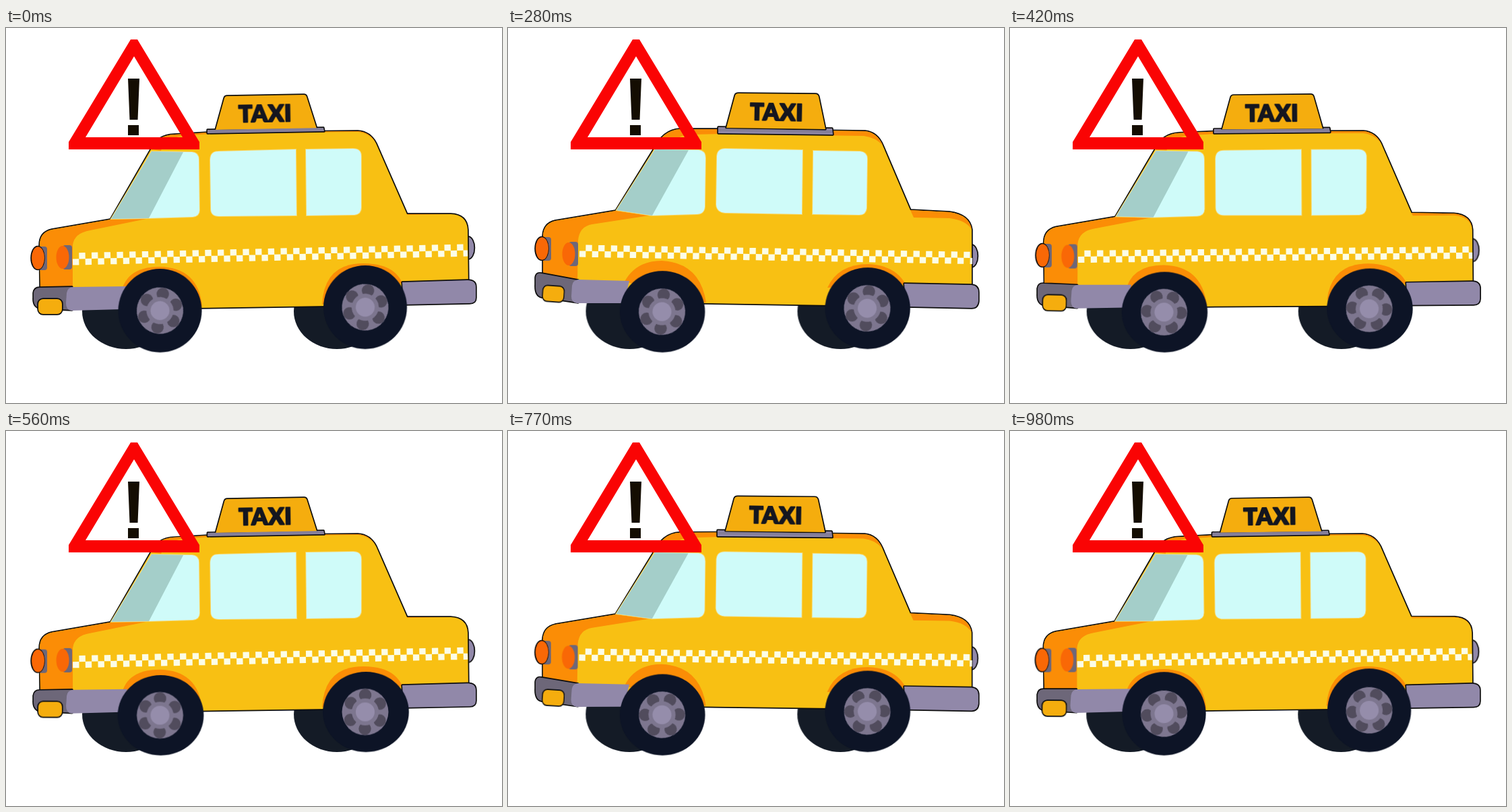
Recreate the animation shown at these times as an HTML page without scripts. Size 736 px wide and 556 px high, loop 1.05 s.

```html
<!DOCTYPE html>
<html lang="en">
<head>
<meta charset="utf-8">
<title>Taxi warning</title>
<style>
  html, body { margin: 0; height: 100%; overflow: hidden; background: #fff; }
  svg { display: block; width: 100vw; height: 100vh; }

  /* Share of the tilted pose, held for 70 ms each */
  :root {
    --sway: linear(
      0 0% 6.667%, .28 6.667% 13.333%, .64 13.333% 20%, .92 20% 26.667%,
      1 26.667% 33.333%, .7 33.333% 40%, .29 40% 46.667%, .05 46.667% 53.333%,
      .02 53.333% 60%, .28 60% 66.667%, .64 66.667% 73.333%, .92 73.333% 80%,
      1 80% 86.667%, .64 86.667% 93.333%, .1 93.333% 100%);
  }
  .bend { animation: bend 1050ms var(--sway) infinite; }
  .shift {
    transform-box: fill-box; transform-origin: 50% 100%;
    animation: shift 1050ms var(--sway) infinite;
  }
  .spin { animation: spin 1050ms steps(15) infinite; }
  @keyframes bend { to { d: var(--to); } }
  @keyframes shift { to { transform: var(--to); } }
  /* The hub repeats every 60 degrees, so 480 degrees closes the loop */
  @keyframes spin { from { transform: rotate(38deg); } to { transform: rotate(-442deg); } }

  .edge { stroke: #0d0d0d; stroke-width: 3.4; stroke-linejoin: round; paint-order: stroke; }
  .yellow { fill: #f8c013; }
  .orange { fill: #fb8d06; }
  .amber { fill: #f5ad0e; }
  .lilac { fill: #9188a9; }
  .grey { fill: #6d6779; }
  .lamp { fill: #f96806; }
  .glass { fill: #cffbf9; stroke: #f9d461; stroke-width: 2; paint-order: stroke; }
  .shade { fill: #a4cec9; }
  .far { fill: #141b26; }
  .tyre { fill: #0d1426; }
  .check { fill: none; stroke: #fcfde6; stroke-width: 9.2; stroke-dasharray: 9.35; }
  .sign {
    font: 900 34px Lato, "Open Sans", sans-serif; text-anchor: middle; letter-spacing: .7px;
    fill: #14161f; stroke: #14161f; stroke-width: 1.8; stroke-linejoin: round;
    transform: translate(0, 0) rotate(-1deg);
  }
</style>
</head>
<body>
<svg viewBox="0 0 736 556">
  <defs>
    <g id="wheel">
      <circle class="tyre shift" r="62" style="--to:translate(1px,0) scale(1.03,.96)"/>
      <g class="shift" style="--to:translate(0,2.5px)">
        <g class="spin" style="transform-origin:0 0">
          <circle r="34.5" fill="#7d768f"/>
          <circle r="25" fill="none" stroke="#514c5d" stroke-width="18.5" stroke-linecap="round" stroke-dasharray="0 26.18"/>
          <circle r="20" fill="#7d768f"/>
          <circle r="14" fill="#958dab"/>
        </g>
      </g>
    </g>
  </defs>

  <!-- Far wheels and tail light -->
  <g class="far shift" style="--to:translate(2.5px,0)">
    <ellipse cx="178" cy="420" rx="65" ry="56"/>
    <ellipse cx="491" cy="420" rx="64" ry="56"/>
  </g>
  <ellipse class="lilac edge shift" cx="686" cy="326" rx="8.5" ry="16" style="--to:translate(2px,12px)"/>

  <!-- Body -->
  <path class="yellow edge bend"
    d="M51 385L50 322Q50 303 68 299L155 284L215 180Q224 159 250 158L300 155L522 153Q540 154 549 171L595 276L660 276Q684 277 685 299L686 385L590 390L480 412L285 415L170 416L100 390Z"
    style="--to:path('M52 368L52 308Q53 290 70 286L160 271L215 182Q230 151 255 150L312 150L530 153Q548 155 556 174L597 270L655 273Q685 277 688 299L688 388L590 392L480 411L290 408L170 405L100 375Z')"/>
  <g class="orange">
    <path class="bend"
      d="M51 386L50 322Q50 303 68 299L155 284L213 282L125 300Q101 304 99 322L99 386Z"
      style="--to:path('M52 370L52 308Q53 290 70 286L160 271L210 278L125 291Q106 294 104 315L103 376Z')"/>
    <path class="bend"
      d="M215 180Q224 159 250 158L300 155L522 153Q540 154 549 171Q540 156 522 154L300 157L262 160Q235 164 230 182Z"
      style="--to:path('M215 182Q230 151 255 150L312 150L530 153Q548 155 556 174Q545 162 528 160L312 157L270 158Q245 160 238 182Z')"/>
    <path class="bend"
      d="M595 276L660 276Q684 277 685 299Q684 277 660 276L596 277Z"
      style="--to:path('M597 270L655 273Q685 277 688 299Q680 285 655 282L602 281Z')"/>
    <path class="bend"
      d="M170 400Q174 354 228 354Q285 355 291 412Z"
      style="--to:path('M173 376Q190 345 228 345Q285 348 294 407Z')"/>
    <path class="bend"
      d="M469 410Q472 349 530 349Q575 349 588 378Z"
      style="--to:path('M474 385Q490 350 535 350Q575 352 590 380Z')"/>
  </g>

  <!-- Checker band -->
  <path class="check bend" stroke-dashoffset="9.35" d="M99 338L685 325" style="--to:path('M106 326L689 336.500')"/>
  <path class="check bend" d="M99 347L685 334" style="--to:path('M106 335L689 345.500')"/>

  <!-- Windows -->
  <path class="glass bend"
    d="M216 183L276 184Q286 185 286 195L287 270Q287 279 277 280L212 282L156 283Z"
    style="--to:path('M218 180L283 181Q293 182 293 193L292 265Q291 276 280 276L214 278L161 270Z')"/>
  <path class="shade bend"
    d="M216 183L263 184L212 282L156 283Z"
    style="--to:path('M218 180L268 181L214 278L161 270Z')"/>
  <path class="glass bend"
    d="M315 183L430 180L431 278L316 279Q304 279 304 268L303 196Q303 183 315 183Z"
    style="--to:path('M322 179L437 181L436 276L322 274Q310 273 309 262L310 190Q311 179 322 179Z')"/>
  <path class="glass bend"
    d="M445 180L515 179Q527 179 527 190L527 266Q527 276 517 277L446 278Z"
    style="--to:path('M453 182L522 183Q533 184 533 194L532 267Q531 277 521 277L452 276Z')"/>

  <!-- Roof sign -->
  <path class="lilac edge bend"
    d="M299 151L471 148L472 153L299 156Z"
    style="--to:path('M312 147L481 149L482 158L312 156Z')"/>
  <path class="amber edge bend"
    d="M311 151L324 104Q325 101 328 101L442 99Q445 99 446 102L461 149Z"
    style="--to:path('M324 148L337 100Q338 97 342 97L456 98Q460 98 461 102L471 150Z')"/>
  <path class="bend" fill="none" stroke="#847e98" stroke-width="4"
    d="M300 153L471 150" style="--to:path('M313 151L481 154')"/>
  <text class="sign shift" x="385" y="139" style="--to:translate(13.5px,-2px) rotate(1.2deg)">TAXI</text>

  <!-- Headlights -->
  <g class="shift" style="--to:translate(3px,-14px)">
    <rect class="grey" x="48" y="324" width="13" height="35" rx="4"/>
    <ellipse class="lamp edge" cx="47" cy="341" rx="9" ry="16.500"/>
    <ellipse class="lamp" cx="48" cy="341" rx="9" ry="16.500"/>
  </g>
  <g class="shift" style="--to:translate(6px,-5px)">
    <rect class="grey" x="84" y="322" width="14" height="36" rx="4"/>
    <ellipse class="lamp" cx="84" cy="340" rx="9.500" ry="17"/>
  </g>

  <!-- Bumpers -->
  <path class="grey edge bend"
    d="M41 393Q42 385 50 385L98 384L98 418L55 416Q40 416 41 400Z"
    style="--to:path('M41 370Q42 362 50 364L104 374L104 407L50 399Q40 397 41 380Z')"/>
  <path class="lilac bend"
    d="M99 384L180 383L172 417L97 419Q89 418 89 408L90 393Q91 385 99 384Z"
    style="--to:path('M104 373L180 375L172 408L102 408Q94 407 94 398L95 382Q96 374 104 373Z')"/>
  <rect class="amber edge shift" x="48" y="402" width="35" height="22" rx="7" style="--to:translate(1px,-19px) rotate(4deg) scale(.87,1)"/>
  <path class="lilac edge bend"
    d="M588 377L685 374Q697 374 697 384L697 400Q697 408 688 408L590 410Z"
    style="--to:path('M588 379L688 381Q698 382 698 392L698 405Q697 415 688 415L590 413Z')"/>

  <use href="#wheel" x="228.500" y="419"/>
  <use href="#wheel" x="533" y="414"/>

  <!-- Warning sign -->
  <path fill="#fa0404" fill-rule="evenodd" d="M185 17H195L287 169V180H93V169ZM190 42L118 162H262Z"/>
  <path fill="#140d02" d="M181 75H198L195.500 136H183.500ZM181 144H197V159H181Z"/>
</svg>
</body>
</html>
```
